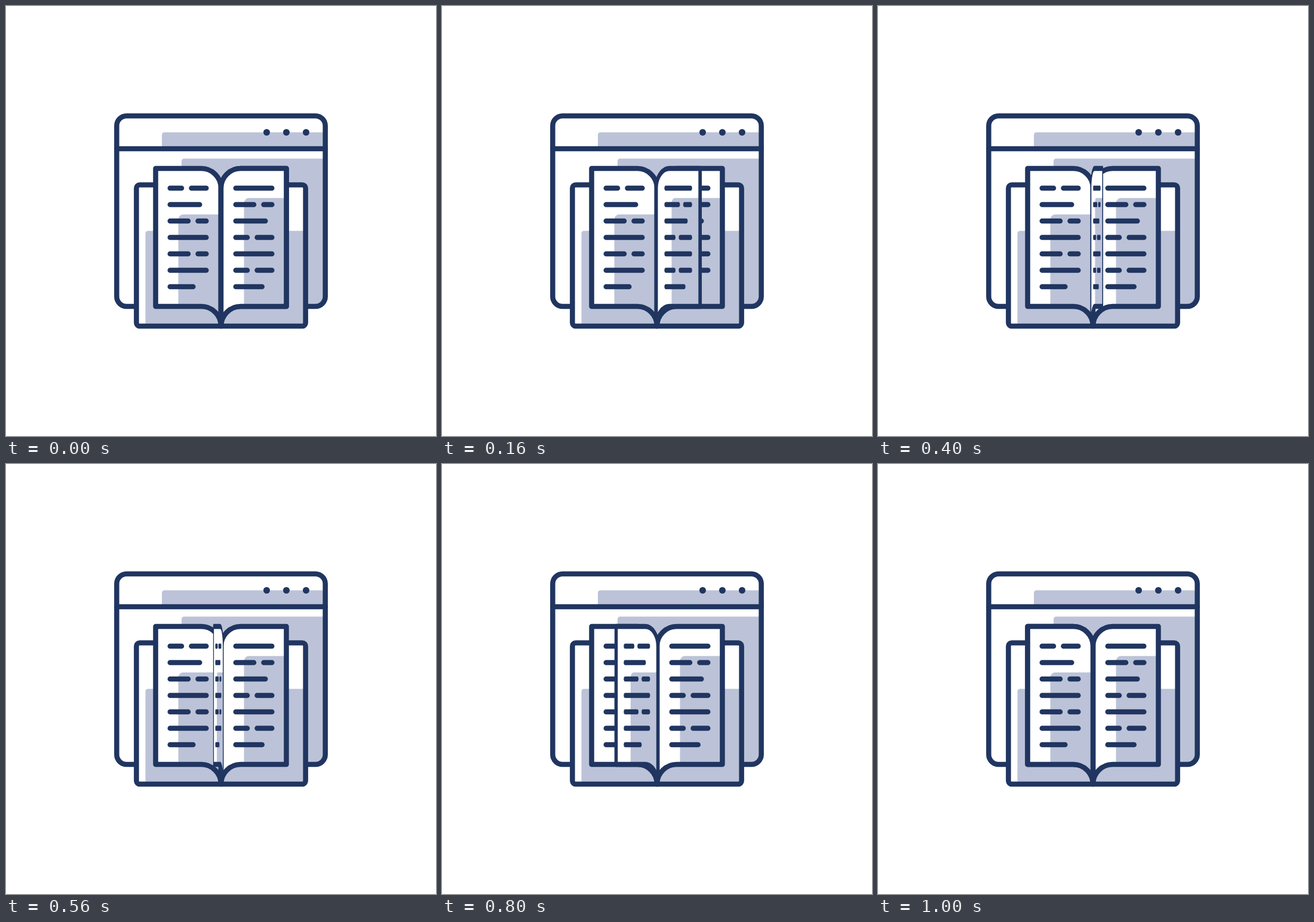
These frames come from a looping animation (720x720 px, 1.04 s). An HTML page with a canvas:

```html
<!DOCTYPE html>
<html lang="en">
<head>
<meta charset="utf-8">
<title>Turning page</title>
<style>
  html, body { margin: 0; height: 100%; overflow: hidden; background: #fff; }
  canvas { display: block; width: 720px; height: 720px; }
</style>
</head>
<body>
<canvas id="stage" width="720" height="720"></canvas>
<script>
const ctx = document.getElementById('stage').getContext('2d');
const INK = '#203560', SHADE = '#bcc3d8', PAPER = '#fff';
const LOOP = 1040, STEP = 40, TURN = 488;

// Lengths are in grid units; the origin is the top of the book's spine.
const UNIT = 5.5, LINE = 1.55;
const EDGE = 19.9, BOTTOM = 42, CURVE = 6;
const MARGIN = 4.5, TEXT = 11, GAP = 3, ROW = 5;

// words: length of the first dash in each row
const LEFT = { side: -1, shade: [-13, 14], words: [3.5, 9, 5.5, TEXT, 5.5, TEXT, 7] };
const RIGHT = { side: 1, shade: [7, 9], words: [TEXT, 5.5, 9, 3.5, TEXT, 3.5, 8] };

function panelPath(half, top, bottom, radius) {
  const path = new Path2D();
  path.roundRect(-half, top, 2 * half, bottom - top, radius);
  return path;
}

// One page, with x measured outwards from the spine.
function pagePath() {
  const path = new Path2D();
  path.moveTo(0, BOTTOM + CURVE);
  path.lineTo(0, CURVE);
  path.arc(CURVE, CURVE, CURVE, Math.PI, 1.5 * Math.PI);
  path.lineTo(EDGE, 0);
  path.lineTo(EDGE, BOTTOM);
  path.lineTo(CURVE, BOTTOM);
  path.arc(CURVE, BOTTOM + CURVE, CURVE, 1.5 * Math.PI, Math.PI, true);
  path.closePath();
  return path;
}

const WINDOW = panelPath(31.75, -16, BOTTOM, 3);
const SHEET = panelPath(25.75, 5, BOTTOM + CURVE, 1);
const PAGE = pagePath();

function shadow(x, y, radius, height = 60) {
  ctx.beginPath();
  ctx.roundRect(x, y, 60, height, [radius, 0, 0, 0]);
  ctx.fillStyle = SHADE;
  ctx.fill();
}

// Paper with shadows kept inside its outline.
function card(path, drawShadows) {
  ctx.fillStyle = PAPER;
  ctx.fill(path);
  ctx.save();
  ctx.clip(path);
  drawShadows();
  ctx.restore();
  ctx.stroke(path);
}

function drawWindow() {
  card(WINDOW, () => {
    shadow(-18, -11, 0.75, 5);
    shadow(-12, -3, 0.75);
  });
  ctx.beginPath();
  ctx.moveTo(-31.75, -6);
  ctx.lineTo(31.75, -6);
  ctx.stroke();
  ctx.fillStyle = INK;
  for (let i = 0; i < 3; i++) {
    ctx.beginPath();
    ctx.arc(13.9 + 6 * i, -11, 1, 0, 2 * Math.PI);
    ctx.fill();
  }
}

function drawText(start, words) {
  ctx.beginPath();
  words.forEach((length, i) => {
    const y = CURVE + ROW * i;
    ctx.moveTo(start, y);
    ctx.lineTo(start + length, y);
    if (length < TEXT / 2 + GAP / 2) {
      ctx.moveTo(start + length + GAP, y);
      ctx.lineTo(start + TEXT, y);
    }
  });
  ctx.stroke();
}

function drawPage({ side, shade, words }, width = 1) {
  ctx.save();
  // Squeeze towards the far side of the spine line.
  ctx.translate(-side * LINE / 2, 0);
  ctx.scale(width, 1);
  ctx.translate(side * LINE / 2, 0);

  ctx.save();
  ctx.scale(side, 1);
  card(PAGE, () => {
    ctx.scale(side, 1);
    shadow(...shade, 1.5);
  });
  ctx.restore();

  drawText(side > 0 ? MARGIN : -MARGIN - TEXT, words);
  ctx.restore();
}

function draw(now) {
  const t = Math.floor(now % LOOP / STEP) * STEP;
  const turn = Math.max(-1, 1 - t / TURN);

  ctx.setTransform(1, 0, 0, 1, 0, 0);
  ctx.fillStyle = PAPER;
  ctx.fillRect(0, 0, 720, 720);
  ctx.setTransform(UNIT, 0, 0, UNIT, 360, 272);
  ctx.strokeStyle = INK;
  ctx.lineWidth = LINE;
  ctx.lineCap = ctx.lineJoin = 'round';

  drawWindow();
  card(SHEET, () => shadow(-23, 19, 0.75));
  drawPage(LEFT);
  drawPage(RIGHT);
  drawPage(turn > 0 ? RIGHT : LEFT, Math.abs(turn));
}

const start = performance.now();
function tick() {
  draw(performance.now() - start);
  requestAnimationFrame(tick);
}
tick();
</script>
</body>
</html>
```
